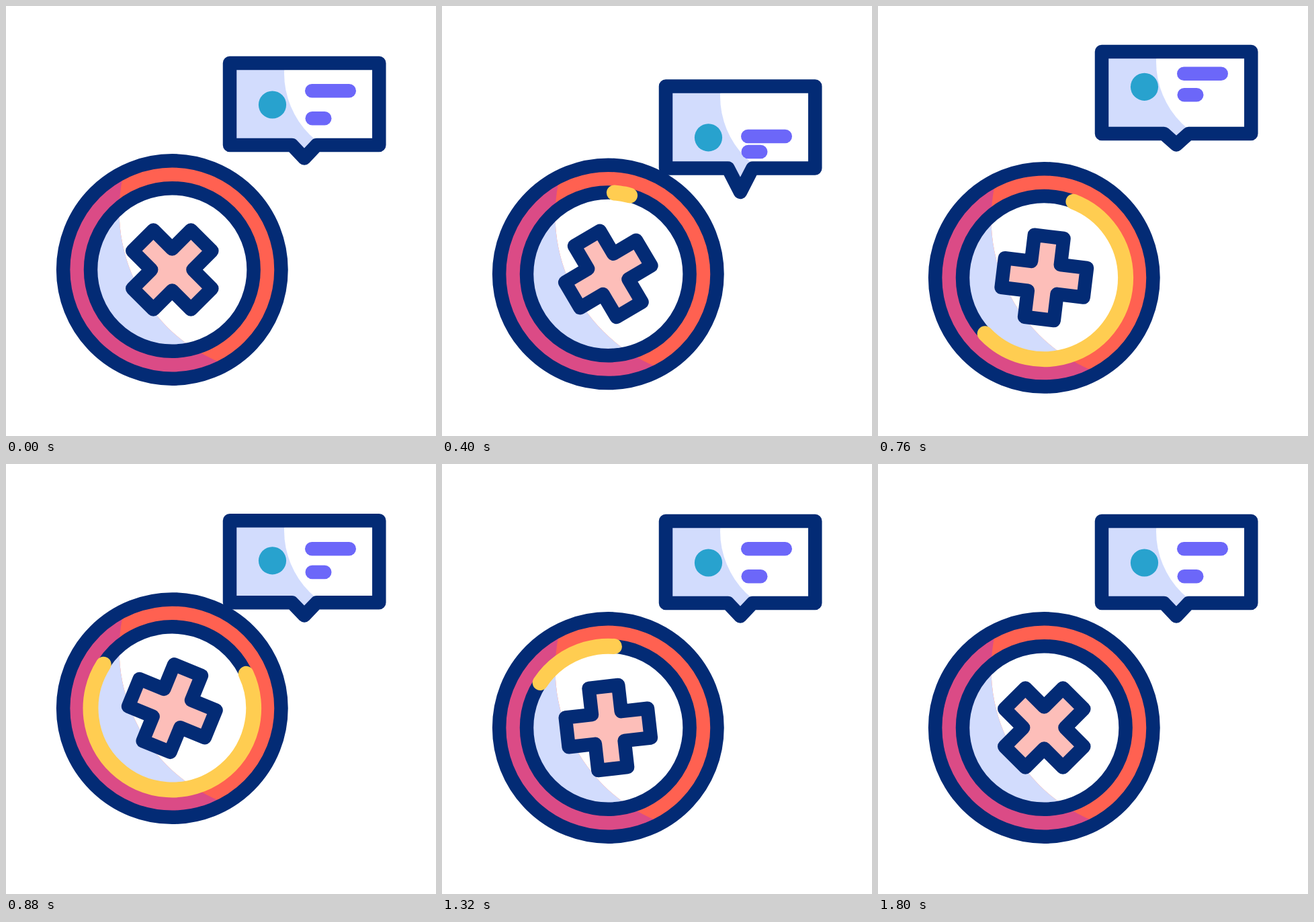
Write an HTML page that moves like this. It is 640 px wide and 640 px high and loops after 2000 ms.

```html
<!DOCTYPE html>
<html lang="en">
<head>
<meta charset="utf-8">
<title>Rejected message</title>
<style>
  html, body { margin: 0; width: 100%; height: 100%; overflow: hidden; background: #fff; }
  svg { display: block; width: 100%; height: 100%; }
  .line { fill: none; stroke: #032b75; stroke-width: 20.5; stroke-linejoin: round; }
</style>
</head>
<body>
<svg viewBox="0 0 640 640">
  <defs>
    <clipPath id="badgeLight"><circle cx="413" cy="305" r="244.5"/></clipPath>
    <clipPath id="bubbleLight"><circle cx="543" cy="100" r="129"/></clipPath>
  </defs>

  <g id="bubble">
    <path class="outline" fill="#d2dcfd"/>
    <path class="outline" fill="#fff" clip-path="url(#bubbleLight)"/>
    <path class="outline line"/>
  </g>
  <circle id="dot" cx="396.5" cy="147" r="20.6" fill="#28a2ce"/>
  <rect id="longBar" x="445" y="116" width="76" height="20.5" rx="10.25" fill="#6c67f9"/>
  <rect id="shortBar" x="445.5" y="157" width="39" height="20.5" rx="10.25" fill="#6c67f9"/>

  <g id="badge">
    <circle cx="247.3" cy="392.5" r="162" fill="#db4b86"/>
    <circle cx="247.3" cy="392.5" r="121" fill="#d2dcfd"/>
    <g clip-path="url(#badgeLight)">
      <circle cx="247.3" cy="392.5" r="162" fill="#ff6151"/>
      <circle cx="247.3" cy="392.5" r="121" fill="#fff"/>
    </g>
    <circle class="line" cx="247.3" cy="392.5" r="162.2"/>
    <circle class="line" cx="247.3" cy="392.5" r="121.3"/>
    <path id="arc" fill="none" stroke="#ffcd51" stroke-width="23" stroke-linecap="round"/>
    <path id="cross" class="line" style="fill:#fdbeb9"
      d="M-22-61.5H22V-22H61.5V22H22V61.5H-22V22H-61.5V-22H-22Z"/>
  </g>
</svg>
<script>
const LOOP = 2000, STEP = 40;
const CX = 247.3, CY = 392.5, RING = 121.3, ARC_ORIGIN = 4.3;
const get = id => document.getElementById(id);
const outlines = document.querySelectorAll('.outline');

const smooth = s => s * s * (3 - 2 * s);
const progress = (t, from, to) => Math.min(1, Math.max(0, (t - from) / (to - from)));

// Eased value through [time, value] keys.
function track(t, keys) {
  let value = keys[0][1];
  for (let i = 1; i < keys.length; i++) {
    const [t0, v0] = keys[i - 1], [t1, v1] = keys[i];
    if (t >= t0) value = v0 + (v1 - v0) * smooth(progress(t, t0, t1));
  }
  return value;
}

// Drop, rise and return, shared by all parts of the bubble.
const bounce = (t, drop, rise, end) => track(t, [[160, 0], [360, drop], [680, rise], [end, 0]]);

// cubic-bezier(1/3, 0, 5/6, 1)
function spinEase(x) {
  let low = 0, high = 1;
  for (let i = 0; i < 24; i++) {
    const s = (low + high) / 2;
    if (s + s * s * (1 - s) / 2 < x) low = s; else high = s;
  }
  return smooth(high);
}

const shift = (id, y) => get(id).setAttribute('transform', `translate(0 ${y})`);

function ringPoint(degrees) {
  const a = (degrees + ARC_ORIGIN) * Math.PI / 180;
  return `${CX + RING * Math.sin(a)} ${CY - RING * Math.cos(a)}`;
}

function arcPath(from, to) {
  if (to - from < 0.01) return '';
  const arcTo = a => `A${RING} ${RING} 0 0 1 ${ringPoint(a)}`;
  const third = (to - from) / 3;
  return `M${ringPoint(from)}` + [1, 2, 3].map(n => arcTo(from + n * third)).join('');
}

function draw(t) {
  const box = bounce(t, 37, -24, 904);
  const tip = 226.5 + bounce(t, 54, -28, 907) - box;
  shift('bubble', box);
  for (const path of outlines)
    path.setAttribute('d', `M333 85H555.3V207H462.3L444 ${tip}L425.6 207H333Z`);
  shift('dot', bounce(t, 52.6, -35.6, 925));
  shift('longBar', bounce(t, 72.4, -38.4, 886));
  shift('shortBar', bounce(t, 54, -45, 942));

  shift('badge', track(t, [[320, 0], [640, 41], [920, -33], [1280, 0]]));
  const arcStart = track(t, [[640, 0], [1560, 360]]);
  const arcEnd = track(t, [[320, 0], [1080, 360]]);
  get('arc').setAttribute('d', arcPath(arcStart, arcEnd));
  const turn = 45 + 180 * spinEase(progress(t, 80, 1800));
  get('cross').setAttribute('transform', `translate(${CX} ${CY}) rotate(${turn})`);
}

function tick() {
  const t = (performance.now() + 4) % LOOP;
  draw(Math.floor(t / STEP) * STEP);
  requestAnimationFrame(tick);
}
tick();
</script>
</body>
</html>
```
